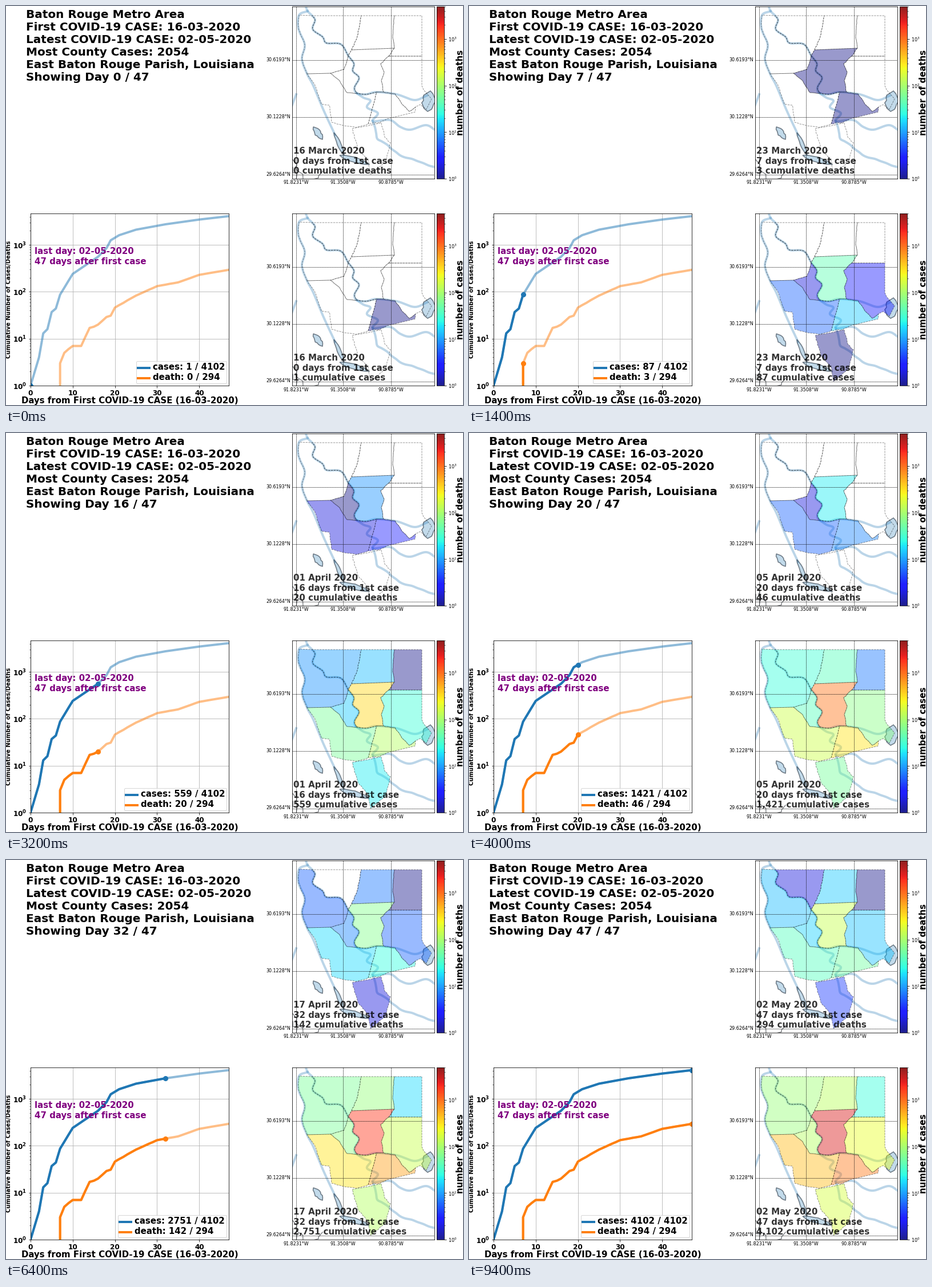
Write a matplotlib script that moves like this. It is 800x700 px and loops after 9.6 s.

```python
import numpy as np
import matplotlib.pyplot as plt
from matplotlib.animation import FuncAnimation
from matplotlib.colors import ListedColormap, LogNorm
from matplotlib.patches import Polygon

W, H, DPI = 800, 700, 100
PX = 72 / DPI          # points per pixel
LAST = 47
VMAX = 5000
MAP_GAP = 363          # distance between the two maps
rng = np.random.default_rng(4)

plt.rcParams.update({
    "font.family": "DejaVu Sans",
    "axes.linewidth": 0.8 * PX,
    "xtick.major.size": 3.5 * PX, "ytick.major.size": 3.5 * PX,
    "xtick.major.width": 0.8 * PX, "ytick.major.width": 0.8 * PX,
    "ytick.minor.size": 2 * PX, "ytick.minor.width": 0.6 * PX,
    "xtick.major.pad": 3.5 * PX, "ytick.major.pad": 3.5 * PX,
    "patch.linewidth": 1 * PX,
})


def growth(keys):
    """Daily totals, growing exponentially between the key days."""
    days = np.arange(LAST + 1)
    logs = np.interp(days, list(keys), np.log(list(keys.values())))
    return np.where(days < min(keys), 0, np.exp(logs).round()).astype(int)


CASES = growth({0: 1, 2: 4, 3: 13, 4: 16, 5: 37, 6: 44, 7: 87, 10: 241,
                16: 559, 18: 850, 19: 1254, 21: 1610, 25: 2111, 32: 2751,
                40: 3471, 47: 4102})
DEATHS = growth({7: 3, 8: 5, 10: 7, 12: 7, 14: 17, 16: 20, 18: 29, 19: 31,
                 20: 46, 25: 83, 30: 132, 35: 159, 40: 230, 47: 294})

# parish: (first day, share of the total)
CASE_SHARE = {
    "coupee": (10, .021), "w_felic": (10, .022), "e_felic": (10, .03),
    "helena": (15, .0065), "w_rouge": (3, .028), "e_rouge": (1, .63),
    "living": (2, .052), "iber": (3, .11), "ascen": (0, .21),
    "assum": (7, .042),
}
DEATH_SHARE = {
    "coupee": (22, .045), "w_felic": (34, .008), "e_felic": (22, .05),
    "helena": (29, .003), "w_rouge": (7, .055), "e_rouge": (7, .48),
    "living": (24, .048), "iber": (9, .13), "ascen": (7, .18),
    "assum": (22, .015),
}


def fill_of(day, total, first, share):
    if day < first:
        return "none"
    ramp = 1 - np.exp((first - day) / 4)
    count = max(1, round(total * share * ramp))
    return plt.cm.jet(np.log(count) / np.log(VMAX), alpha=0.4)


def rough(pts, amp=0.7, step=4):
    """Subdivide a line and shake its inner points."""
    pts = np.array(pts, float)
    out = [pts[0]]
    for a, b in zip(pts[:-1], pts[1:]):
        n = max(1, int(np.hypot(*(b - a)) // step))
        for k in range(1, n + 1):
            out.append(a + (b - a) * k / n + rng.uniform(-amp, amp, 2) * (k < n))
    return np.array(out)


def curve(pts, n=8):
    """Catmull-Rom curve through all points."""
    p = np.array(pts, float)
    p = np.vstack([2 * p[0] - p[1], p, 2 * p[-1] - p[-2]])
    t = np.linspace(0, 1, n, endpoint=False)[:, None]
    parts = [b + t / 2 * (c - a + t * (2 * a - 5 * b + 4 * c - d
                                       + t * (3 * (b - c) + d - a)))
             for a, b, c, d in zip(p, p[1:], p[2:], p[3:])]
    return np.vstack(parts + [p[-2:-1]])


def lake(start, end, width):
    """Uneven lens between two points."""
    a, b = np.array(start, float), np.array(end, float)
    t = np.linspace(0, 1, 9)[:, None]
    side = np.array([a[1] - b[1], b[0] - a[0]]) / np.hypot(*(b - a))
    half = np.sin(np.pi * t) ** 0.6 * width / 2
    up, down = (half * rng.uniform(0.7, 1.1, t.shape) for _ in range(2))
    mid = a + (b - a) * t
    return np.vstack([mid + side * up, (mid - side * down)[::-1]])


# Borders in stage pixels of the upper map; neighbours share them.
UPPER = [(536, 17), (541, 25), (537, 41), (554, 54), (561, 65), (586, 67),
         (599, 87)]
MIDDLE = [(599, 87), (609, 101), (607, 114), (618, 126), (610, 143), (614, 153)]
LOWER = [(614, 153), (630, 155), (649, 151)]
WEST = [(513, 16), (512, 40), (523, 68), (518, 93), (527, 119)]

upper, middle, lower = curve(UPPER), curve(MIDDLE), curve(LOWER)
west = rough(curve(WEST, 3))
felic = rough([(622, 17), (614, 57), (605, 77)])
helena_w = rough([(680, 17), (677, 52), (680, 74)])
helena_sw = rough([(680, 74), (670, 88)])
amite = rough([(670, 88), (656, 101), (662, 116), (657, 131), (661, 151)])
amite_s = rough([(661, 151), (681, 154), (693, 172), (706, 185), (717, 177)])
ascen_w = rough([(649, 151), (634, 207)], 0.3)
coupee_e = rough([(599, 87), (592, 111), (568, 118)])
rouge_w = rough([(568, 118), (584, 131), (597, 152), (614, 153)])
south = rough([(634, 207), (655, 204), (667, 198)], 1.2)
iber_sw = rough([(634, 207), (613, 213), (588, 209), (570, 204), (566, 174),
                 (552, 172), (540, 137), (527, 119)], 0.5)

PARISHES = {
    "coupee": [west[::-1], upper, coupee_e],
    "w_felic": [upper[::-1], felic],
    "e_felic": [felic[::-1], helena_w],
    "helena": [helena_w, helena_sw, [(728, 88), (728, 17)]],
    "w_rouge": [coupee_e, rouge_w, middle[::-1]],
    "e_rouge": [felic[-1:], helena_sw, amite, lower[::-1], middle[::-1]],
    "living": [amite, amite_s, [(725, 173), (736, 181), (745, 163),
                                (731, 147), (728, 140), (728, 88)]],
    "iber": [rouge_w, lower, ascen_w, iber_sw],
    "ascen": [ascen_w[::-1], amite_s, [(716, 186)], south[::-1]],
    "assum": [rough([(606, 215), (657, 205), (663, 230), (673, 240),
                     (664, 274), (638, 296), (634, 271), (616, 250),
                     (606, 215)])],
}
RIVERS = [
    curve([(524, -2), (528, 9)] + UPPER + MIDDLE[1:] + LOWER[1:]
          + [(684, 155), (715, 165), (737, 157)]),
    curve([(528, 9)] + WEST + [(538, 140), (556, 183), (576, 226)]),
    curve([(614, 153), (626, 161), (638, 166), (632, 178), (651, 188),
           (642, 202), (672, 200), (690, 212), (708, 217), (735, 209),
           (752, 218)]),
    curve(rough([(642, 202), (650, 233), (690, 262), (720, 272), (752, 283)],
                1.5, 9)),
    curve([(508, 155), (500, 176)]),
]
LAKES = [lake((743, 149), (738, 185), 25), lake((538, 212), (554, 234), 11),
         lake((574, 222), (592, 262), 7), lake((584, 262), (636, 278), 10)]
SHORES = [rough(ends, 4, 6) for ends in
          ([(501, 263), (520, 304)], [(538, 304), (554, 290)],
           [(502, 283), (508, 304)])]
LONS = {508: "91.8231°W", 590: "91.3508°W", 674: "90.8785°W"}
LATS = {95: "30.6193°N", 195: "30.1228°N", 295.5: "29.6264°N"}

fig = plt.figure(figsize=(W / DPI, H / DPI), dpi=DPI, facecolor="white")


def box(left, top, right, bottom):
    return fig.add_axes([left / W, 1 - bottom / H,
                         (right - left) / W, (bottom - top) / H])


def text(x, y, s, size, weight="bold", **kw):
    return fig.text(x / W, 1 - y / H, s, fontsize=size * PX,
                    fontweight=weight, **kw)


def build_map(dy, label):
    """Draw one map with its colour bar; return its parishes and caption."""
    ax = box(501, 1 + dy, 750, 303 + dy)
    ax.set(xlim=(501, 750), ylim=(303, 1), xticks=[], yticks=[])
    for pts in RIVERS:
        ax.plot(*pts.T, color="tab:blue", alpha=0.3, lw=4 * PX, zorder=1)
    for pts in LAKES:
        ax.add_patch(Polygon(pts, fc=(0.12, 0.47, 0.71, 0.27),
                             ec=(0.2, 0.25, 0.3, 0.65), lw=1.6 * PX, zorder=1.2))
    for pts in SHORES:
        ax.plot(*pts.T, color="#7c7f82", lw=1.4 * PX, zorder=1.1)
    patches = {}
    for name, arcs in PARISHES.items():
        patches[name] = ax.add_patch(
            Polygon(np.vstack(arcs), fc="none", ec=(0, 0, 0, 0.45), ls="--",
                    lw=0.9 * PX, zorder=2))
    grid = dict(color="black", lw=0.9 * PX, dashes=(1, 1), zorder=2.5)
    for x, s in LONS.items():
        ax.axvline(x, **grid)
        text(x, 310 + dy, s, 8, "normal", ha="center", va="center")
    for y, s in LATS.items():
        ax.axhline(y, **grid)
        text(498, y - 0.5 + dy, s, 8, "normal", ha="right", va="center")

    cax = box(754, 1 + dy, 767, 303 + dy)
    colors = plt.cm.jet(np.linspace(0, 1, 256)) * 0.88 + 0.12
    bar = plt.cm.ScalarMappable(LogNorm(1, VMAX), ListedColormap(colors.clip(0, 1)))
    fig.colorbar(bar, cax=cax)
    cax.tick_params(labelsize=8 * PX)
    text(795, 152 + dy, label, 15, rotation=90, ha="center", va="center")
    caption = text(503, 294 + dy, "", 15, alpha=0.8, va="baseline")
    return patches, caption


def build_chart():
    ax = box(43, 364, 390, 666)
    ax.set_yscale("log")
    ax.set(xlim=(0, LAST), ylim=(1, 4676), xticks=range(0, 41, 10))
    ax.grid(True, color="#b0b0b0", lw=0.8 * PX)
    ax.tick_params(labelsize=12 * PX)
    for tick in ax.get_xticklabels() + ax.get_yticklabels():
        tick.set_fontweight("bold")
    series = []
    for data, color in ((CASES, "tab:blue"), (DEATHS, "tab:orange")):
        ax.plot(data, color=color, alpha=0.5, lw=4 * PX)
        line, = ax.plot([], [], color=color, lw=4 * PX, label="-")
        dot, = ax.plot([], [], "o", color=color, ms=8 * PX, mew=PX)
        series.append((data, line, dot))
    legend = ax.legend(handles=[s[1] for s in series], loc="lower right",
                       fontsize=10 * PX, borderpad=0.3, labelspacing=0.3,
                       handletextpad=0.6, borderaxespad=0.4)
    for t in legend.get_texts():
        t.set(fontsize=15 * PX, fontweight="bold")
    text(217, 692.5, "Days from First COVID-19 CASE (16-03-2020)", 15,
         ha="center", va="center")
    text(5.5, 514.5, "Cumulative Number of Cases/Deaths", 10, rotation=90,
         ha="center", va="center")
    text(50, 452.5, "last day: 02-05-2020\n47 days after first case", 15,
         color="purple", va="baseline")
    return series, legend.get_texts()


def date_of(day):
    d = 16 + day
    for month, length in (("March", 31), ("April", 30), ("May", 31)):
        if d <= length:
            return f"{d:02d} {month} 2020"
        d -= length


series, legend_texts = build_chart()
maps = [(build_map(0, "number of deaths"), DEATH_SHARE, DEATHS, "deaths"),
        (build_map(MAP_GAP, "number of cases"), CASE_SHARE, CASES, "cases")]
header = text(34.8, 131, "", 20, va="baseline")
HEADER = """Baton Rouge Metro Area
First COVID-19 CASE: 16-03-2020
Latest COVID-19 CASE: 02-05-2020
Most County Cases: 2054
East Baton Rouge Parish, Louisiana
Showing Day {} / {}"""


def update(day):
    header.set_text(HEADER.format(day, LAST))
    for (data, line, dot), label, name in zip(series, legend_texts,
                                              ("cases", "death")):
        line.set_data(np.arange(day + 1), data[:day + 1])
        dot.set_data([day], [data[day]])
        label.set_text(f"{name}: {data[day]} / {data[-1]}")
    for (patches, caption), shares, data, word in maps:
        for name, patch in patches.items():
            patch.set_facecolor(fill_of(day, data[day], *shares[name]))
        caption.set_text(f"{date_of(day)}\n{day} days from 1st case\n"
                         f"{data[day]:,} cumulative {word}")


anim = FuncAnimation(fig, update, frames=LAST + 1, interval=200,
                     init_func=lambda: update(0), repeat=True, repeat_delay=0)
plt.show()
```
